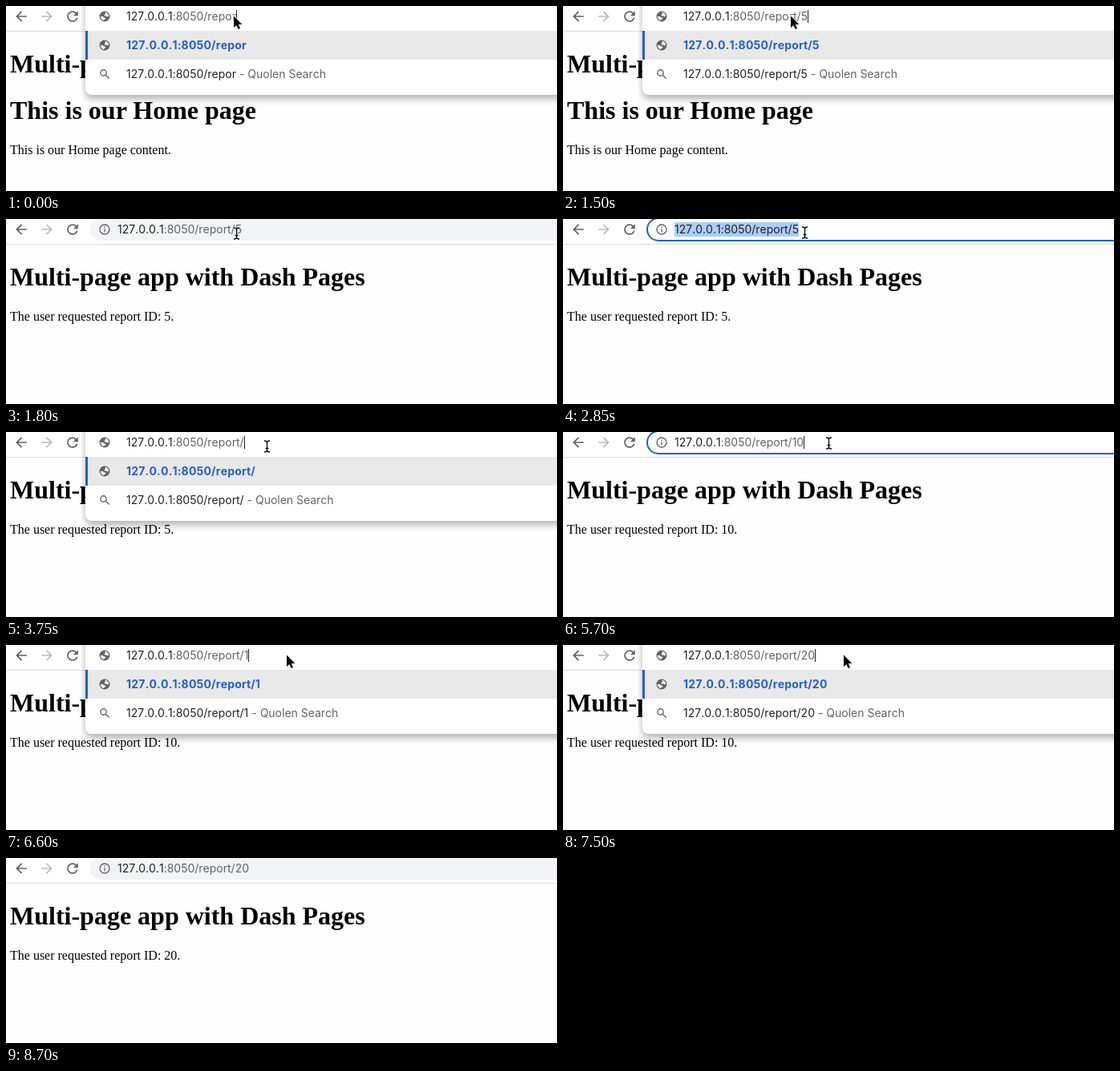
These frames come from a looping animation (687x231 px, 9160 ms). An HTML page:

```html
<!DOCTYPE html>
<html lang="en">
<head>
<meta charset="utf-8">
<title>Report pages</title>
<style>
  html, body { margin: 0; width: 100%; height: 100%; overflow: hidden; background: #fefefe; }
  svg { display: block; width: 687px; height: 231px; }
  text { white-space: pre; }
  .ui { font: 14px Inter, Roboto, sans-serif; font-kerning: none; font-feature-settings: "calt" 0; }
  .h1 { font: bold 32px "Liberation Serif", "Times New Roman", serif; }
  .p { font: 16px "Liberation Serif", "Times New Roman", serif; }
  .dark { fill: #202124; }
  .grey { fill: #5f6368; }
  .match { font-weight: 700; letter-spacing: .2px; fill: #2360c5; }
  .sheet { filter: drop-shadow(0 5px 5px rgba(0, 0, 0, .3)); }
</style>
</head>
<body>
<svg viewBox="0 0 687 231">
  <defs>
    <clipPath id="below"><rect y="32" width="687" height="199"/></clipPath>
    <clipPath id="around"><rect x="94" width="593" height="127"/></clipPath>
    <path id="arrow" d="M20 11H7.83l5.59-5.59L12 4l-8 8 8 8 1.41-1.41L7.83 13H20v-2z"/>
    <g id="globe">
      <circle r="6.5" fill="#5f6368"/>
      <path fill="#fff" d="M.5-5.2Q4.4-4.4 5.2-.4L3.4.6 2.2-.6.4-.4-.6-1.8.9-3ZM-5.2-.2L-2 .2-.2 1.6 1.6 2.2.8 3.6-.6 3.8-1 5.2Q-4.8 4-5.2-.2Z"/>
    </g>
    <path id="beam" fill="none" d="M-3.5-7Q0-7 0-5Q0-7 3.5-7M0-5.5V5.5M-3.5 7Q0 7 0 5Q0 7 3.5 7M-2 2.5H2"/>
  </defs>

  <rect width="687" height="231" fill="#fefefe"/>
  <text class="h1" x="5" y="83">Multi-page app with Dash Pages</text>
  <g id="home">
    <text class="h1" x="5" y="141">This is our Home page</text>
    <text class="p" x="5" y="185">This is our Home page content.</text>
  </g>
  <text id="report" class="p" x="5" y="127"></text>

  <g id="bar">
    <rect width="687" height="31" fill="#fff"/>
    <rect y="31" width="687" height="1" fill="#dcdcde"/>
    <g class="grey">
      <use href="#arrow" transform="translate(8.8 2.8) scale(.85)"/>
      <use href="#arrow" transform="translate(61.2 2.8) scale(-.85 .85)" fill="#b9bbbe"/>
      <path id="reload" transform="translate(72.8 2.8) scale(.85)" d="M17.65 6.35C16.2 4.9 14.21 4 12 4c-4.42 0-7.99 3.58-7.99 8s3.57 8 7.99 8c3.73 0 6.84-2.55 7.73-6h-2.08c-.82 2.33-3.04 4-5.65 4-3.31 0-6-2.69-6-6s2.69-6 6-6c1.66 0 3.14.69 4.22 1.78L13 11h7V4l-2.35 2.35z"/>
      <path id="stop" transform="translate(72.8 2.8) scale(.85)" d="M19 6.41 17.59 5 12 10.59 6.41 5 5 6.41 10.59 12 5 17.59 6.41 19 12 13.41 17.59 19 19 17.59 13.41 12z"/>
    </g>
    <rect id="pill" x="105" y="-1" width="620" height="28" rx="14"/>
    <g fill="none" stroke="#5f6368" stroke-width="1.3">
      <circle cx="123" cy="13" r="6"/>
      <path d="M123 12.2V16.4M123 9.5V10.9"/>
    </g>
  </g>

  <g id="popup">
    <g clip-path="url(#around)">
      <rect class="sheet" x="99" y="-20" width="640" height="131" rx="8" fill="#fff"/>
    </g>
    <rect x="99" y="31" width="588" height="36" fill="#e8e8e8"/>
    <rect x="99" y="31" width="3" height="36" fill="#2360c5"/>
    <use href="#globe" x="123" y="13"/>
    <use href="#globe" x="123" y="49"/>
    <g fill="none" stroke="#5f6368" stroke-width="1.4">
      <circle cx="121.5" cy="83.5" r="3.7"/>
      <path d="M124.2 86.2L128.6 90.6"/>
    </g>
    <text id="match" class="ui match" x="150" y="54"></text>
    <text class="ui dark" x="150" y="90"><tspan id="query"></tspan><tspan class="grey"> - Quolen Search</tspan></text>
  </g>

  <rect id="selection" x="139" y="4" height="18" fill="#abcdf7"/>
  <text id="url" class="ui dark" y="18">127.0.0.1<tspan id="path"></tspan></text>
  <rect id="caret" y="5" width="1" height="16" fill="#202124"/>

  <g id="pointer">
    <path d="M0 0V14.5L3.3 11.4 5.6 16.6 8 15.6 5.8 10.6H10.2Z" stroke="#fff" stroke-width="1.6" paint-order="stroke"/>
  </g>
  <g id="ibeam">
    <use href="#beam" stroke="#fff" stroke-width="3" opacity=".7"/>
    <use href="#beam" stroke="#000" stroke-width="1.3"/>
  </g>
</svg>
<script>
const LOOP = 9160;
const el = {};
document.querySelectorAll('svg [id]').forEach(node => el[node.id] = node);

const pointer = (x, y) => ({ cursor: ['pointer', x, y] });
const ibeam = (x, y) => ({ cursor: ['ibeam', x, y] });
const typing = tail => ({ view: 'popup', path: tail, caret: true, ring: false, selected: false });
const leaving = { view: 'fading', caret: false, loading: true };
const loaded = id => ({ view: 'bar', page: id, caret: false, loading: false });
const select = { ring: true, selected: true, caret: false };
const edit = { ring: true, selected: false, caret: true };

// Each step lists only what changes at its time.
const steps = [
  [0, { ...typing('repor'), page: null, loading: false, ...pointer(284, 12.5) }],
  [150, typing('report')],
  [750, { caret: false }],
  [900, typing('report/')],
  [1500, typing('report/5')],
  [1650, { ...leaving, ...ibeam(287.5, 18) }],
  [1800, loaded(5)],
  [2550, ibeam(293.5, 19)],
  [2700, ibeam(299.5, 18)],
  [2850, { ...select, ...ibeam(301.5, 17) }],
  [3000, ibeam(305.5, 17)],
  [3150, edit],
  [3300, ibeam(325.5, 18)],
  [3750, typing('report/')],
  [3900, pointer(332, 18)],
  [4050, typing('report/1')],
  [4200, typing('report/10')],
  [4650, { ...leaving, ...ibeam(333.5, 19) }],
  [4800, loaded(10)],
  [5100, pointer(336, 30)],
  [5250, pointer(337, 36)],
  [5400, ibeam(333.5, 19)],
  [5550, { ...select, ...ibeam(331.5, 14) }],
  [5700, edit],
  [5850, ibeam(332.5, 14)],
  [6000, select],
  [6150, edit],
  [6600, { ...typing('report/1'), ...pointer(350, 12.5) }],
  [6750, typing('report/')],
  [7200, typing('report/2')],
  [7500, typing('report/20')],
  [7950, { ...loaded(20), ...ibeam(351.5, 13.5) }],
  [8400, pointer(375, 34)],
  [8550, pointer(445, 94)],
  [8700, { cursor: null }]
];

const show = (node, on) => node.setAttribute('display', on ? 'inline' : 'none');
const set = (node, attrs) => {
  for (const key in attrs) node.setAttribute(key, attrs[key]);
};

function draw(time) {
  const state = Object.assign({}, ...steps.filter(([at]) => at <= time).map(([, change]) => change));
  const { view, path, page, cursor } = state;
  const open = view === 'popup';
  const tail = ':8050/' + path;

  show(el.home, page === null);
  show(el.report, page !== null);
  el.report.textContent = `The user requested report ID: ${page}.`;

  show(el.reload, !state.loading);
  show(el.stop, state.loading);
  set(el.pill, state.ring
    ? { fill: '#fff', stroke: '#1a62cc', 'stroke-width': 2 }
    : { fill: '#f1f3f4', stroke: 'none' });

  show(el.popup, view !== 'bar');
  set(el.popup, {
    opacity: open ? 1 : .36,
    'clip-path': open ? 'none' : 'url(#below)'
  });
  el.match.textContent = el.query.textContent = '127.0.0.1' + tail;

  const x = open ? 150 : 139;
  el.path.textContent = tail;
  el.path.setAttribute('class', state.selected ? 'dark' : 'grey');
  set(el.url, { x });
  const width = el.url.getComputedTextLength();
  show(el.selection, state.selected);
  set(el.selection, { width });
  show(el.caret, state.caret);
  set(el.caret, { x: Math.round(x + width) });

  for (const kind of ['pointer', 'ibeam']) {
    const on = cursor !== null && cursor[0] === kind;
    show(el[kind], on);
    if (on) set(el[kind], { transform: `translate(${cursor[1]} ${cursor[2]})` });
  }
}

const start = performance.now();
function tick() {
  draw((performance.now() - start) % LOOP);
  requestAnimationFrame(tick);
}
tick();
</script>
</body>
</html>
```
